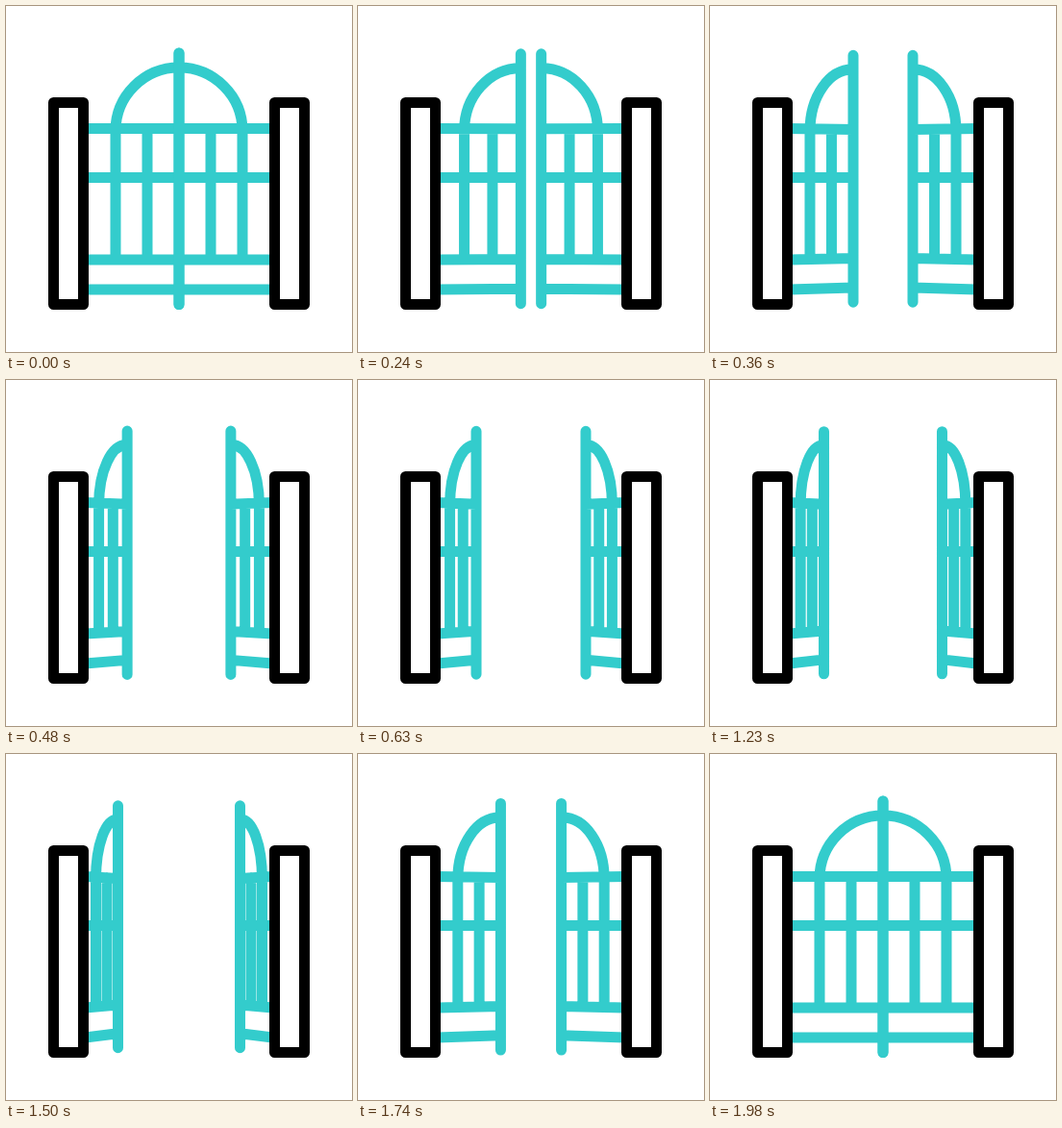
Recreate the animation shown at these times as an HTML page. Size 360x360 px, loop 2040 ms.

```html
<!DOCTYPE html>
<html lang="en">
<head>
<meta charset="utf-8">
<title>Gate</title>
<style>
html, body { margin: 0; width: 100%; height: 100%; overflow: hidden; background: #fff; }
svg { display: block; width: 100vw; height: 100vh; }
path, rect {
  fill: none;
  stroke-width: 11;
  stroke-linecap: round;
  stroke-linejoin: round;
}
.leaf { stroke: #33cccc; animation: swing 2040ms linear infinite; }
.post { stroke: #000; }

/* Rails, bars and arch of one leaf: swing open, drift on, swing shut */
@keyframes swing {
  0% {
    d: path("M82.5 127.5L180 127.5M82.5 178.5L180 178.5M82.5 264L180 264M82.5 295L180 295M114 127.5L114 264M147 127.5L147 264M180 49L180 310.5M114 130C114 93.6 143.6 64 180 64");
    animation-timing-function: cubic-bezier(.72, 0, .667, 1);
  }
  26.47% {
    d: path("M82.5 127.5L123.7 129.2M82.5 178.5L123.7 178.6M82.5 264L123.7 261.3M82.5 295L123.7 291.2M95.8 128L95.8 263.1M109.7 128.7L109.7 262.2M123.7 53.3L123.7 306.2M95.8 130.5C95.8 94.5 108.3 66.4 123.7 67.8");
    animation-timing-function: linear;
  }
  73.53% {
    d: path("M82.5 127.5L116.5 129.4M82.5 178.5L116.5 178.6M82.5 264L116.5 260.9M82.5 295L116.5 290.7M93.5 128.1L93.5 263M105 128.8L105 262M116.5 53.8L116.5 305.7M93.5 130.6C93.5 94.6 103.8 66.7 116.5 68.3");
    animation-timing-function: cubic-bezier(.333, 0, .667, 1);
  }
  97.06%, 100% {
    d: path("M82.5 127.5L180 127.5M82.5 178.5L180 178.5M82.5 264L180 264M82.5 295L180 295M114 127.5L114 264M147 127.5L147 264M180 49L180 310.5M114 130C114 93.6 143.6 64 180 64");
  }
}
</style>
</head>
<body>
<svg viewBox="0 0 360 360">
  <path class="leaf"/>
  <g transform="matrix(-1 0 0 1 360 0)"><path class="leaf"/></g>
  <rect class="post" x="49.5" y="100.5" width="31" height="210"/>
  <rect class="post" x="279.5" y="100.5" width="31" height="210"/>
</svg>
</body>
</html>
```
